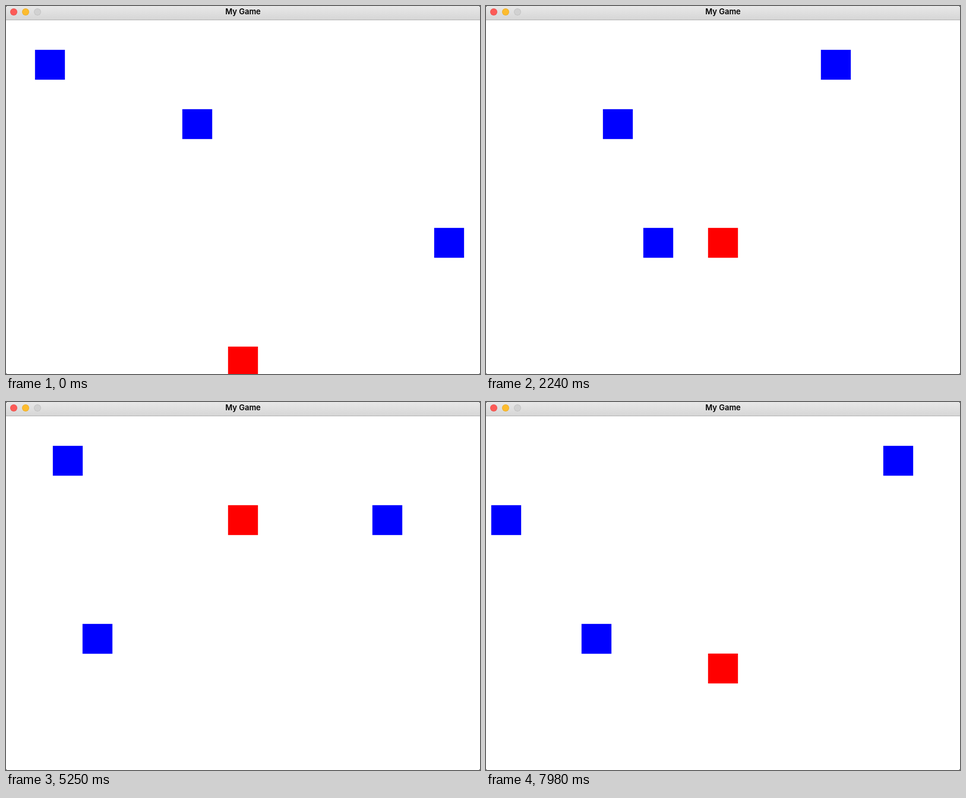
Animation of 798x620 px, one loop 8000 ms. Source, as an HTML page:

```html
<!DOCTYPE html>
<html lang="en">
<head>
<meta charset="utf-8">
<title>My Game</title>
<style>
  html, body { margin: 0; width: 100%; height: 100%; overflow: hidden; background: #000; }
  #window {
    position: relative; width: 798px; height: 620px; overflow: hidden;
    background: #fff; border-radius: 3px 3px 2px 2px;
  }
  #bar {
    position: absolute; inset: 0 0 auto; height: 23px;
    background: linear-gradient(#e8e8e8, #d6d6d6); border-bottom: 1px solid #b3b3b3;
    font: 600 13px/19px Inter, sans-serif; text-align: center; color: #000;
  }
  #bar i {
    position: absolute; left: var(--x); top: 4px; width: 12px; height: 12px;
    border-radius: 50%; background: var(--fill); box-shadow: inset 0 0 0 1px #0001;
  }
  .box {
    position: absolute; left: 0; top: 0; width: 50px; height: 50px;
    color: #00f; background: currentColor; box-shadow: 0 0 1px currentColor;
  }
  #player { color: #f00; }
</style>
</head>
<body>
<div id="window">
  <div class="box" id="player"></div>
  <div id="bar">
    <i style="--x: 7px; --fill: #fc5b57"></i>
    <i style="--x: 27px; --fill: #fdbc2e"></i>
    <i style="--x: 47px; --fill: #d1d1d1"></i>
    My Game
  </div>
</div>
<script>
const LOOP = 8000, STEP = 70, STEPS = 114, TICKS = 450;
const SIZE = 50, START_Y = 574, HIT_STEP = 88;

// Enemies bounce between lo and hi, moving left at first.
const enemies = [
  { y: 74, x: 49, speed: 5, lo: -6, hi: 754 },
  { y: 174, x: 297, speed: 4, lo: -3, hi: 753 },
  { y: 374, x: 721, speed: 8, lo: -7, hi: 753 },
];

const stage = document.getElementById('window');
const player = document.getElementById('player');
for (const enemy of enemies) {
  enemy.el = document.createElement('div');
  enemy.el.className = 'box';
  stage.append(enemy.el);
}

const place = (el, x, y) => { el.style.transform = `translate(${x}px, ${y}px)`; };

// Game ticks run at a steady rate with a slow drift.
function tickAt(step) {
  const angle = Math.PI * step / STEPS;
  return Math.round(TICKS * step / STEPS - 1.6 * Math.sin(2 * angle) + 0.8 * Math.sin(angle));
}

function bounce({ x, speed, lo, hi }, tick) {
  const span = hi - lo;
  const travelled = (hi - x + speed * tick) % (2 * span);
  return hi - (travelled > span ? 2 * span - travelled : travelled);
}

// The player hops up, slows after six hops, and starts over when hit.
function playerY(step) {
  const t = step % HIT_STEP + 1;
  const hops = Math.min(t / 7, 6 + (t - 42) / 13, 8);
  return START_Y - SIZE * Math.max(0, Math.floor(hops));
}

function draw(now) {
  const step = Math.floor((now % LOOP) / STEP);
  const tick = tickAt(step);
  for (const enemy of enemies) place(enemy.el, bounce(enemy, tick), enemy.y);
  place(player, 374, playerY(step));
}

const start = performance.now();
function loop() {
  draw(performance.now() - start);
  requestAnimationFrame(loop);
}
loop();
</script>
</body>
</html>
```
